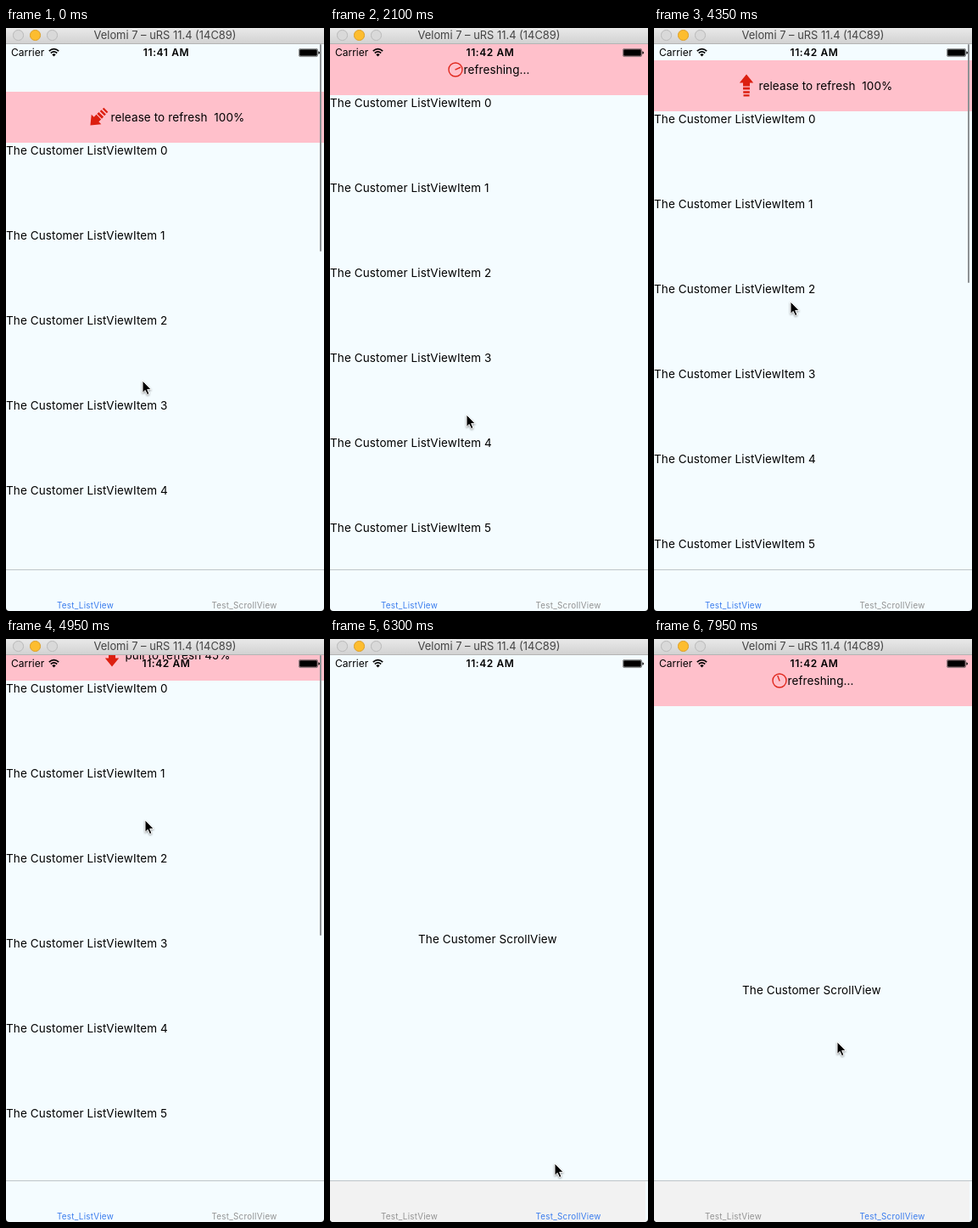
These frames come from a looping animation (375x686 px, 8 s). An HTML page:

```html
<!DOCTYPE html>
<html lang="en">
<head>
<meta charset="utf-8">
<title>Pull to refresh</title>
<style>
html, body { margin: 0; width: 100%; height: 100%; overflow: hidden; background: #000; }
#stage {
  position: relative; width: 375px; height: 686px; overflow: hidden;
  border-radius: 0 0 4px 4px; background: #f4fcff; color: #000;
  font: 13.5px/18px Inter, Roboto, sans-serif; letter-spacing: .1px; white-space: nowrap;
}
#stage div, #stage svg.abs { position: absolute; }
#view { left: 0; top: 19px; width: 375px; height: 618px; overflow: hidden; }
#content, #list { left: 0; top: 0; width: 375px; }
#head {
  left: 0; top: -60px; width: 375px; height: 60px; background: #ffc0cb;
  display: flex; align-items: center; justify-content: center;
}
#head svg { flex: none; }
#label { white-space: pre; }
#note { left: 104px; top: 325px; }
#bar { left: 369.5px; top: 0; width: 2.5px; border-radius: 2px; background: #8d9194; }
#tabs { left: 0; top: 637px; width: 375px; height: 49px; }
#tabs::before { content: ""; position: absolute; left: 0; top: 0; width: 375px; height: 1px; background: #bfc5c8; }
#fill { left: 0; top: 1px; width: 372px; height: 48px; background: #f2f2f2; }
.tab { top: 33px; width: 187px; text-align: center; font-size: 9.9px; letter-spacing: .25px; color: #929292; }
.tab.on { color: #3a7cee; }
#title {
  left: 0; top: 0; width: 375px; height: 18px; border-bottom: 1px solid #b4b4b4;
  background: linear-gradient(#e9e9e9, #d2d2d2);
  font-size: 12.9px; line-height: 17px; letter-spacing: 0; text-align: center; color: #444;
}
.dot { top: 2px; width: 10.5px; height: 10.5px; border: 1px solid #bababa; border-radius: 50%; background: #d9d9d9; }
.dot.mid { border-color: #dd9f27; background: #fdbd2f; }
#carrier { left: 6px; top: 20px; font-size: 12px; letter-spacing: 0; }
#clock { left: 139px; top: 20px; width: 100px; text-align: center; font-size: 12px; font-weight: 600; letter-spacing: .6px; }
</style>
</head>
<body>
<div id="stage">
  <div id="view">
    <div id="content">
      <div id="head">
        <svg id="arrow" width="30" height="30" viewBox="-15 -15 30 30" fill="#dc1f10">
          <path id="shape" d="M0 13.5L8.2 3.5H4V-.5H-4V3.5H-8.2ZM-4-1.7H4V-4.6H-4ZM-3.8-6.2H3.8V-8.7H-3.8ZM-3.5-10.3H3.5V-12.5H-3.5Z"/>
        </svg>
        <svg id="spin" width="18" height="18" viewBox="-9 -9 18 18" fill="none" stroke="#e0281e" stroke-width="1.4">
          <circle r="8"/><path id="hand" d="M0 .5V-6.5"/>
        </svg>
        <span id="label"></span>
      </div>
      <div id="list"></div>
      <div id="note">The Customer ScrollView</div>
    </div>
    <div id="bar"></div>
  </div>

  <div id="tabs">
    <div id="fill"></div>
    <div class="tab" id="tabList" style="left:0">Test_ListView</div>
    <div class="tab" id="tabScroll" style="left:187.5px">Test_ScrollView</div>
  </div>

  <div id="carrier">Carrier</div>
  <svg class="abs" style="left:50px;top:23px" width="13" height="12" viewBox="0 0 13 12" fill="none" stroke="#000" stroke-width="1.7">
    <path d="M.8 4.2Q6.5-1 12.2 4.2M2.8 6.5Q6.5 3.2 10.2 6.5"/>
    <path d="M4.3 8.2Q6.5 6.4 8.7 8.2L6.5 10.6Z" fill="#000" stroke="none"/>
  </svg>
  <div id="clock"></div>
  <svg class="abs" style="left:345px;top:24px" width="26" height="11" viewBox="0 0 26 11">
    <rect x=".4" y=".4" width="22.2" height="9.2" rx="1.6" fill="none" stroke="#555" stroke-width=".7"/>
    <rect x="1.2" y="1.2" width="20.6" height="7.6" rx=".8"/>
    <path d="M23.4 3.2Q25 3.6 25 5T23.4 6.8Z"/>
  </svg>

  <div id="title">Velomi 7 – uRS 11.4 (14C89)
    <div class="dot" style="left:8px"></div>
    <div class="dot mid" style="left:28px"></div>
    <div class="dot" style="left:48px"></div>
  </div>

  <svg class="abs" id="cursor" style="left:0;top:0;filter:drop-shadow(0 1px 1px #0006)" width="14" height="20" viewBox="-1 -1 14 20">
    <path d="M0 0V14.4L3.2 11.4L5.5 16.6L8 15.5L5.7 10.4H10.2Z" stroke="#fff" stroke-width="1" stroke-linejoin="round"/>
  </svg>
</div>

<script>
const LOOP = 8000, STEP = 150, HEAD = 60, THRESHOLD = 66;
const $ = id => document.getElementById(id);
const show = (id, on) => $(id).style.display = on ? '' : 'none';

const span = (t, from, len) => Math.min(1, Math.max(0, (t - from) / len));
const smooth = u => u * u * (3 - 2 * u);
const settle = (t, from) => (1 - span(t, from, 600)) ** 3;

// The middle gesture pulls the list down and pushes it back without letting go.
const sway = t => 81 * Math.sin(Math.PI * span(t, 3108, 2230)) ** 1.5;

function pull(t) {
  if (t < 450) return 116 + 17 * smooth(span(t, 0, 450));
  if (t < 2250) return HEAD + 73 * settle(t, 450);
  if (t < 3100) return HEAD * settle(t, 2100);
  if (t < 6000) return sway(t);
  if (t < 7350) return 82 * smooth(span(t, 6850, 500));
  return HEAD + 22 * settle(t, 7350);
}

// Places where the pointer turns or rests: time, x, y.
const stops = [[0, 161, 415], [450, 161, 455], [2250, 161, 455], [3150, 167, 165], [4350, 161, 164],
  [4950, 164, 152], [5250, 166, 165], [6000, 270, 651], [6150, 270, 651], [6900, 218, 320], [7350, 216, 474]];

function pointer(t) {
  const i = Math.max(1, stops.findIndex(s => s[0] > t));
  const last = stops[stops.length - 1];
  const [a, b] = t >= last[0] ? [last, last] : [stops[i - 1], stops[i]];
  const u = a === b ? 0 : smooth(span(t, a[0], b[0] - a[0]));
  return [a[1] + (b[1] - a[1]) * u, a[2] + (b[2] - a[2]) * u + 2 * sway(t)];
}

// The arrow flips up and down in turn at these moments.
const flips = [-75, 2100, 3860, 4580, 7160];
const turn = t => flips.reduce((sum, f, i) => sum + (i % 2 ? -180 : 180) * span(t, f, 300), 0);

for (let i = 0; i < 10; i++) {
  const item = document.createElement('div');
  item.style.top = i * 100 + 'px';
  item.textContent = 'The Customer ListViewItem ' + i;
  $('list').append(item);
}

function draw(t) {
  const y = Math.round(pull(t));
  const second = t >= 6000;
  const busy = (t >= 600 && t < 2250) || t >= 7500;
  const pct = Math.min(100, Math.floor(y / THRESHOLD * 100));

  $('content').style.transform = `translateY(${y}px)`;
  show('list', !second);
  show('note', second);
  show('fill', second);
  show('bar', !second && y > 0 && !busy);
  $('bar').style.height = 360 - y + 'px';
  $('tabList').classList.toggle('on', !second);
  $('tabScroll').classList.toggle('on', second);

  show('arrow', !busy);
  show('spin', busy);
  $('label').textContent = busy ? 'refreshing...'
    : pct < 100 ? `pull to refresh ${pct}%` : 'release to refresh  100%';
  $('shape').setAttribute('transform', `rotate(${turn(t)})`);
  const angle = second ? 340 + (t - 7950) * .36 : 65 + (t - 2100) * .36;
  $('hand').setAttribute('transform', `rotate(${angle})`);

  $('clock').textContent = t < 600 ? '11:41 AM' : '11:42 AM';
  const [px, py] = pointer(t);
  $('cursor').style.transform = `translate(${Math.round(px) - 1}px, ${Math.round(py) - 1}px)`;
}

let start;
function tick(now) {
  start ??= now;
  draw(Math.floor((now - start) % LOOP / STEP) * STEP);
  requestAnimationFrame(tick);
}
draw(0);
requestAnimationFrame(tick);
</script>
</body>
</html>
```
